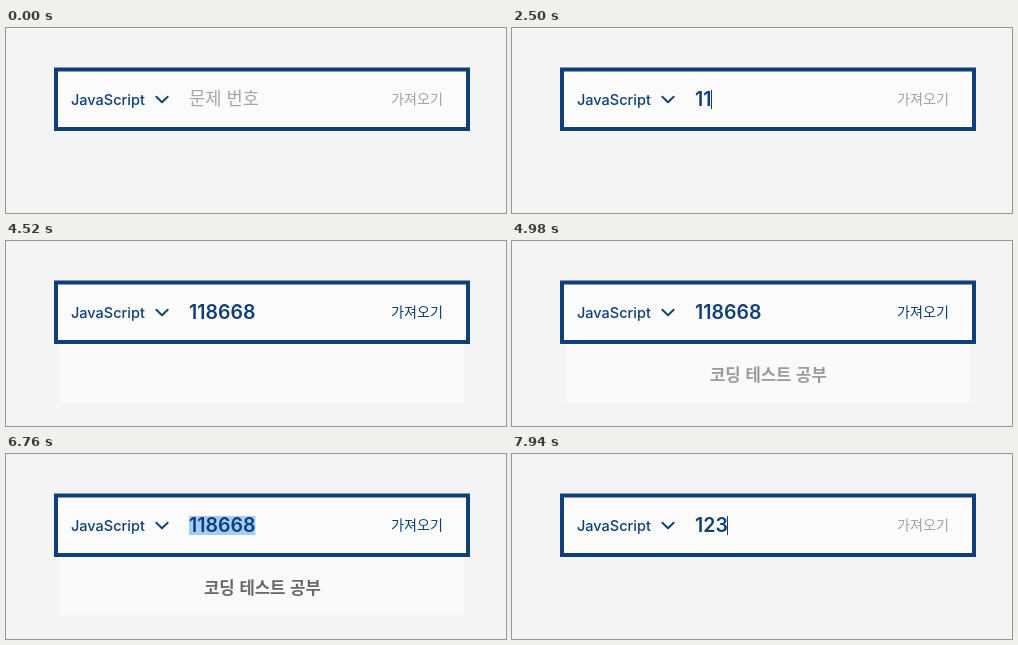
These frames come from a looping animation (500x185 px, 8 s). An HTML page:

```html
<!DOCTYPE html>
<html lang="ko">
<head>
<meta charset="utf-8">
<style>
  html, body { margin: 0; width: 100%; height: 100%; overflow: hidden; background: #f4f4f4; }
  svg { display: block; }
  text { font-family: "Noto Sans CJK KR", "Noto Sans CJK", "Noto Sans KR", sans-serif; }
  .latin { font-family: Inter, "Noto Sans CJK KR", sans-serif; fill: #0e3f78; }
</style>
</head>
<body>
<svg width="500" height="185" viewBox="0 0 500 185">
  <rect width="500" height="185" fill="#f4f4f4"/>
  <g id="panel">
    <rect x="54" y="100" width="404" height="61.5" fill="#fafafa"/>
    <text id="title" x="198" y="140" font-size="16.7" font-weight="700" fill="#686868">코딩 테스트 공부</text>
  </g>
  <rect x="50" y="41.5" width="412" height="59.5" fill="#fbfbfb" stroke="#0f3f78" stroke-width="4"/>
  <text class="latin" x="65" y="77" font-size="14.5" font-weight="500">JavaScript</text>
  <path d="M150.3 68.7 L156 74.2 L161.7 68.7" fill="none" stroke="#0f3f78" stroke-width="1.9" stroke-linecap="round" stroke-linejoin="round"/>
  <rect id="selection" x="183" y="62" width="0" height="19" fill="#a3cdf8"/>
  <text id="hint" x="183" y="77" font-size="17.7" font-weight="300" fill="#a6a6a6">문제 번호</text>
  <text id="number" class="latin" x="183" y="78" font-size="19.5" font-weight="600"></text>
  <rect id="caret" y="62" width="1" height="19" fill="#0e3f78"/>
  <text id="button" x="385" y="76.2" font-size="14.1" font-weight="500">가져오기</text>
</svg>
<script>
const LOOP = 8000, LEFT = 183;
const $ = id => document.getElementById(id);
const [panel, title, selection, hint, number, caret, button] =
  ['panel', 'title', 'selection', 'hint', 'number', 'caret', 'button'].map($);

// [time, field value]
const typing = [
  [0, ''], [1700, '1'], [2180, '11'], [2620, '118'], [2880, '1186'],
  [3140, '11866'], [3400, '118668'], [6780, '1'], [7220, '12'], [7640, '123']
];
const SUBMIT = 3860, PRESS = 5720, DRAG = 6320, RETYPE = 6780;

const ramp = (t, start, length) => {
  const p = Math.min(1, Math.max(0, (t - start) / length));
  return p * p * (3 - 2 * p);
};
const mix = (a, b, p) => 'rgb(' + a.map((v, i) => Math.round(v + (b[i] - v) * p)) + ')';
const show = (el, on) => el.setAttribute('visibility', on ? 'visible' : 'hidden');
const widthOf = n => n > 0 ? number.getSubStringLength(0, n) : 0;

function caretOn(t, keyTime) {
  if (t >= SUBMIT && t < PRESS) return false;
  if (t >= PRESS && t < RETYPE) return t < DRAG;
  if (keyTime === 0) return t >= 520 && Math.floor((t - 520) / 500) % 2 === 0;
  return Math.floor((t - keyTime) / 500) % 2 === 0;
}

function draw(t) {
  const [keyTime, value] = typing.filter(k => k[0] <= t).pop();
  if (number.textContent !== value) number.textContent = value;
  show(hint, !value);

  const end = widthOf(value.length);
  caret.setAttribute('x', Math.round(LEFT + end - (value ? 0.5 : 0)));
  show(caret, caretOn(t, keyTime));

  // dragging leftwards selects one digit at a time
  const dragging = t >= DRAG && t < RETYPE;
  const picked = dragging ? Math.min(6, 1 + Math.floor((t - DRAG) / 24)) : 0;
  const from = widthOf(value.length - picked);
  selection.setAttribute('x', LEFT + from);
  selection.setAttribute('width', picked ? end - from : 0);

  const ready = ramp(t, 3400, 200) - ramp(t, RETYPE, 200);
  button.setAttribute('fill', mix([163, 163, 163], [14, 63, 120], ready));

  panel.setAttribute('opacity', ramp(t, SUBMIT, 400) - ramp(t, RETYPE, 400));
  title.setAttribute('opacity', ramp(t, 4620, 600));
}

const start = performance.now();
function tick() {
  draw((performance.now() - start) % LOOP);
  requestAnimationFrame(tick);
}
draw(0);
requestAnimationFrame(tick);
</script>
</body>
</html>
```
